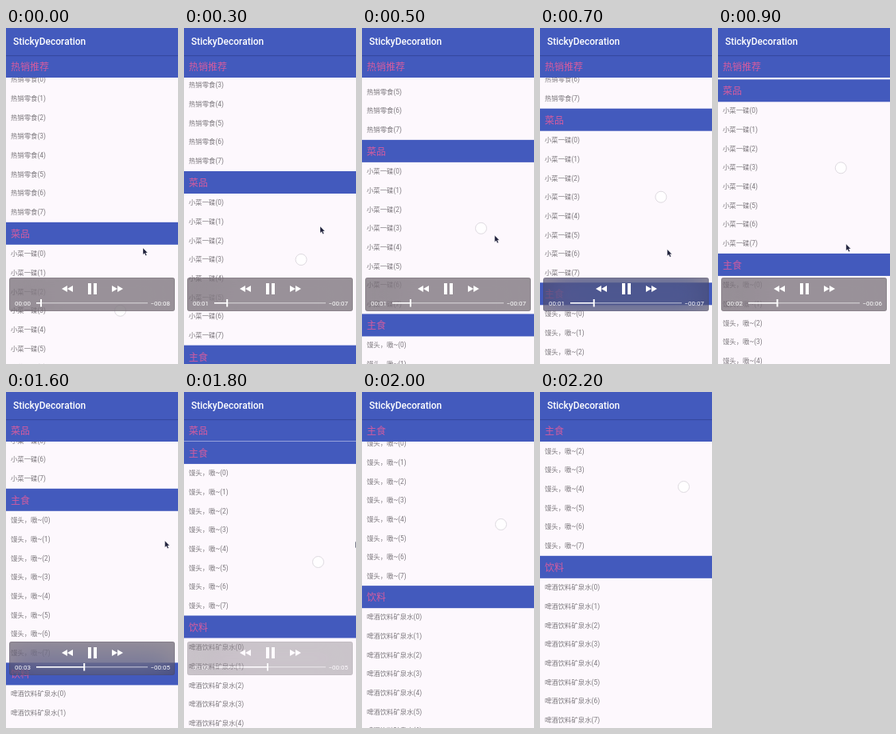
Animation, 216 px wide and 420 px high, one loop 2.3 s. Source, as an HTML page:

```html
<!DOCTYPE html>
<html lang="zh-CN">
<head>
<meta charset="utf-8">
<title>StickyDecoration</title>
<style>
  html, body { margin: 0; width: 100%; height: 100%; overflow: hidden; }
  body { position: relative; background: #fdf8fd; font-family: Roboto, "Noto Sans CJK SC", "Noto Sans CJK", sans-serif; }
  #stage { position: absolute; left: 0; top: 0; width: 216px; height: 420px; overflow: hidden; }
  #stage div, #stage > svg { position: absolute; left: 0; top: 0; }
  #bar { width: 207px; height: 34px; padding-left: 9px; background: #435abd; color: #fff; font: 500 12px/34px Roboto, sans-serif; box-shadow: 0 0 1px 1px #3549a0; }
  .row { left: 6px !important; font-size: 8.4px; line-height: 23.65px; color: #7d797e; white-space: nowrap; }
  .head { width: 210px; height: 28.4px; padding-left: 6px; background: #435abd; color: #d45c9f; font-size: 12px; font-weight: 500; line-height: 30px; }
  #finger { width: 13px; height: 13px; margin: -7.5px; border: 1px solid #dedae0; border-radius: 50%; background: #fffc; }
  #hud { left: 4px !important; top: 312px !important; width: 208px; height: 42px; border-radius: 3px; overflow: hidden; background: rgba(70, 62, 70, .55); box-shadow: inset 0 0 0 1px #3c344026; backdrop-filter: blur(20px) saturate(2.2); }
  #hud svg { display: block; }
  #hud text { font: 8px Roboto, sans-serif; }
</style>
</head>
<body>
<div id="stage">
  <div id="list"></div>
  <div id="bar">StickyDecoration</div>
  <div id="finger"></div>
  <div id="hud">
    <svg width="208" height="42" viewBox="4 312 208 42" fill="#fff">
      <path d="M77 322v8l-7-4zM84 322v8l-7-4zM133 322v8l7-4zM140 322v8l7-4zM103 319h4v14h-4zM110 319h4v14h-4z"/>
      <path d="M38 343h140v1.5h-140z" opacity=".45"/>
      <rect id="played" x="38" y="343" height="1.5"/>
      <rect id="knob" y="339" width="2" height="9.5"/>
      <text id="elapsed" x="11" y="346.5"></text>
      <text id="left" x="206" y="346.5" text-anchor="end"></text>
    </svg>
  </div>
  <svg id="cursor" width="8" height="11" overflow="visible"><path d="M0 0v8.2l1.9-1.6 1.4 3 1.5-.7-1.4-2.9h2.5z" fill="#20223c" stroke="#fff" stroke-width=".3"/></svg>
</div>
<script>
const STEP = 100, STEPS = 23;
const BAR = 34, HEAD = 28.4, ROW = 23.65, ROWS = 8, SECTION = HEAD + ROW * ROWS;
const $ = id => document.getElementById(id);
const linear = p => p;
const smooth = p => p * p * (3 - 2 * p);

// Key points: step, then the values reached there
const scroll = [[0, 242.8], [3, 179], [7, 100.7], [13, -8.5], [18, -155.7], [22, -230.4]];
const pointer = [[0, 172, 275], [3, 171, 248], [8, 158.5, 280], [13, 181, 185], [19, 218, 187]];

function at(keys, n, ease) {
  const i = keys.findIndex(k => k[0] > n);
  if (i < 0) return keys.at(-1).slice(1);
  const [from, ...a] = keys[i - 1], [to, ...b] = keys[i];
  const p = ease((n - from) / (to - from));
  return a.map((v, j) => v + (b[j] - v) * p);
}

function add(parent, cls, text = "") {
  const el = document.createElement("div");
  el.className = cls;
  el.textContent = text;
  return parent.appendChild(el);
}

function move(el, x, y) {
  el.style.transform = `translate(${x}px, ${y}px)`;
}

const sections = [["热销推荐", "热销零食"], ["菜品", "小菜一碟"], ["主食", "馒头，嗷~"], ["饮料", "啤酒饮料矿泉水"]]
  .map(([title, item]) => {
    const box = add($("list"), "section");
    for (let i = 0; i < ROWS; i++)
      add(box, "row", `${item}(${i})`).style.top = HEAD + ROW * i + "px";
    return { box, head: add(box, "head", title) };
  });

function drawList(base) {
  sections.forEach(({ box, head }, i) => {
    const top = base + (i - 1) * SECTION;
    move(box, 0, top);
    // The sticky header is pushed away by the next one
    move(head, 0, Math.min(Math.max(0, BAR - top), SECTION - HEAD));
  });
}

// The first drag carries the list, a second one follows after the fling
function drawFinger(n, base) {
  $("finger").hidden = n > 14 && n < 17;
  if (n <= 14) move($("finger"), 143 + 1.2 * n, base + 110);
  else move($("finger"), 114 + 3 * n, 635 - 23.5 * n);
}

function drawPlayer(n) {
  const done = 6 + 3.39 * n, sec = Math.min(3, Math.floor(done / 16.1));
  $("played").setAttribute("width", done);
  $("knob").setAttribute("x", 37 + done);
  $("elapsed").textContent = "00:0" + sec;
  $("left").textContent = "−00:0" + (8 - sec);
  $("hud").style.opacity = Math.max(0, Math.min(1, (20 - n) / 4));
}

function tick() {
  const n = Math.floor(performance.now() / STEP) % STEPS;
  const [base] = at(scroll, n, linear);
  drawList(base);
  drawFinger(n, base);
  drawPlayer(n);
  move($("cursor"), ...at(pointer, n, smooth));
  requestAnimationFrame(tick);
}
tick();
</script>
</body>
</html>
```
